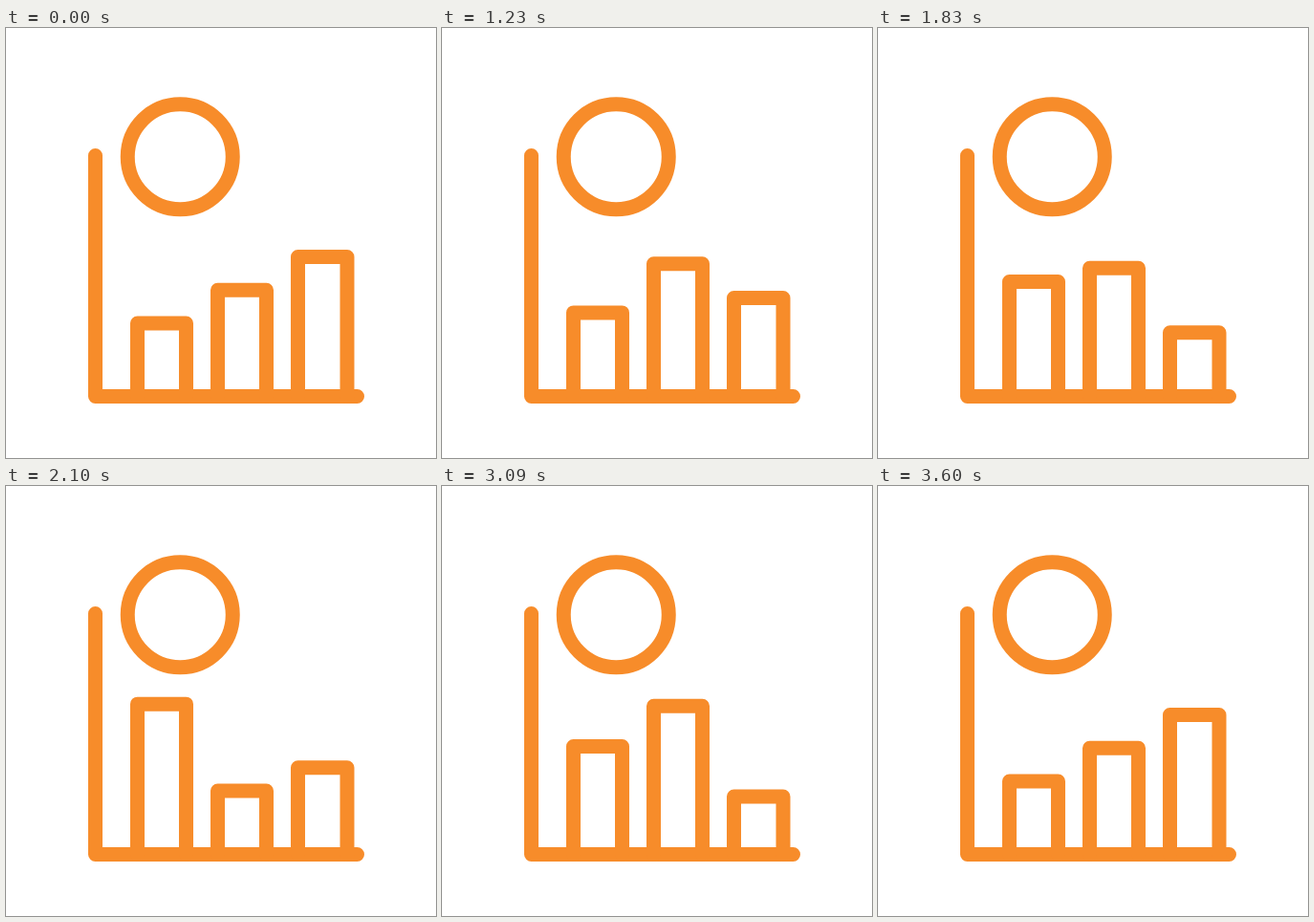
Recreate the animation shown at these times as an HTML page. Size 450x450 px, loop 3930 ms.

```html
<!DOCTYPE html>
<html lang="en">
<head>
<meta charset="utf-8">
<title>Bar chart</title>
<style>
  html, body { margin: 0; width: 100%; height: 100%; overflow: hidden; background: #fff; }
  svg { display: block; width: 100%; height: 100%; }
</style>
</head>
<body>
<svg viewBox="0 0 450 450" fill="none" stroke="#f78c2a" stroke-width="15" stroke-linecap="round" stroke-linejoin="round">
  <circle cx="182.25" cy="134.75" r="55"/>
  <path d="M93.5 133.5V385.5H367.5"/>
  <path class="bar"/>
  <path class="bar"/>
  <path class="bar"/>
</svg>
<script>
  const LOOP = 3930, STEP = 30;
  const times = [900, 1590, 2250, 2940, 3600];
  // Edges of each bar and the height of its top at every key time
  const bars = [
    { left: 137.5, right: 188.5, tops: [309, 285.2, 219.5, 267, 309] },
    { left: 221.5, right: 272.5, tops: [274.3, 215.5, 334.7, 223.5, 274.3] },
    { left: 305.5, right: 357, tops: [239.5, 331.5, 289.2, 338, 239.5] },
  ];
  const paths = document.querySelectorAll('.bar');
  const ease = p => p * p * (3 - 2 * p);

  function topAt(tops, t) {
    if (t <= times[0] || t >= times[4]) return tops[0];
    const i = times.findIndex(end => t < end) - 1;
    const p = (t - times[i]) / (times[i + 1] - times[i]);
    return tops[i] + (tops[i + 1] - tops[i]) * ease(p);
  }

  function draw(now) {
    const t = Math.floor((now % LOOP) / STEP) * STEP;
    bars.forEach(({ left, right, tops }, i) =>
      paths[i].setAttribute('d', `M${left} 385.5V${topAt(tops, t)}H${right}V385.5`));
    requestAnimationFrame(() => draw(performance.now()));
  }
  draw(0);
</script>
</body>
</html>
```
